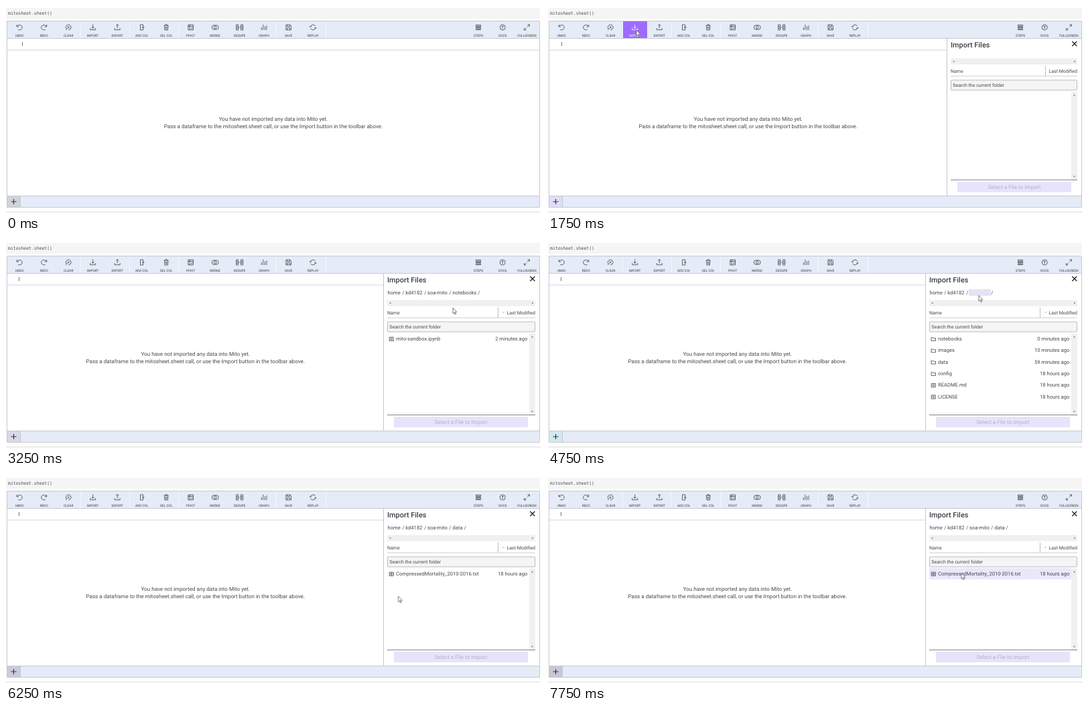
These frames come from a looping animation (800 px wide and 310 px high, 8 s). An HTML page:

```html
<!DOCTYPE html>
<html lang="en">
<head>
<meta charset="utf-8">
<title>Import files</title>
<style>
html, body { margin: 0; width: 100%; height: 100%; overflow: hidden; background: #fff; }
svg { display: block; width: 800px; height: 310px; font-family: Roboto, "Open Sans", sans-serif; text-rendering: geometricPrecision; }
text { fill: #444950; font-size: 7.6px; white-space: pre; }
.label { font-size: 4.75px; text-anchor: middle; fill: #333; }
.code { font: 6.45px "DejaVu Sans Mono", monospace; }
.msg { font-size: 8.1px; text-anchor: middle; }
.title { font-size: 10.9px; font-weight: 500; fill: #3a3f46; }
.small { font-size: 7px; }
.end { text-anchor: end; }
.btn { font-size: 8.15px; text-anchor: middle; fill: #b6adc8; }
.icon { fill: none; stroke: #3c4048; stroke-width: .8; }
.lit .icon { stroke: #fff; }
.lit text { fill: #fff; }
.hot { fill: #ebe7fb; }

.anim { animation: 8s step-end infinite; visibility: hidden; }
#idle { animation-name: idle; }
#empty { animation-name: empty; }
#notebooks { animation-name: notebooks; }
#project { animation-name: project; }
#data { animation-name: data; }
#hotImport { animation-name: hotImport; }
.hotCrumb { animation-name: hotCrumb; }
#project .hotRow0 { animation-name: hotFirst; }
#project .hotRow2 { animation-name: hotThird; }
#data .hotRow0 { animation-name: hotFile; }
#add { animation: add 8s step-end infinite; }
#pointer { animation: move 8s infinite; }

@keyframes idle { 0% { visibility: visible } 21.875%, 100% { visibility: hidden } }
@keyframes empty { 0% { visibility: hidden } 21.875% { visibility: visible } 25%, 100% { visibility: hidden } }
@keyframes notebooks { 0% { visibility: hidden } 25% { visibility: visible } 56.25%, 100% { visibility: hidden } }
@keyframes project { 0% { visibility: hidden } 56.25% { visibility: visible } 75%, 100% { visibility: hidden } }
@keyframes data { 0% { visibility: hidden } 75%, 100% { visibility: visible } }
@keyframes hotImport { 0% { visibility: hidden } 18.75% { visibility: visible } 28.125%, 100% { visibility: hidden } }
@keyframes hotCrumb { 0% { visibility: hidden } 50% { visibility: visible } 62.5%, 100% { visibility: hidden } }
@keyframes hotFirst { 0% { visibility: hidden } 65.625% { visibility: visible } 68.75%, 100% { visibility: hidden } }
@keyframes hotThird { 0% { visibility: hidden } 68.75% { visibility: visible } 75%, 100% { visibility: hidden } }
@keyframes hotFile { 0% { visibility: hidden } 93.75%, 100% { visibility: visible } }
@keyframes add {
  0% { fill: #d0d4d9 } 21.875% { fill: #e2dcf7 } 40.625% { fill: #d9d8e8 } 59.375% { fill: #d2e8f2 }
  68.75% { fill: #c9cbda } 81.25% { fill: #c6c1dc } 96.875%, 100% { fill: #c6c8d7 }
}
@keyframes move {
  0% { visibility: hidden; transform: translate(210px, 190px); animation-timing-function: step-end }
  6.25% { visibility: visible; transform: translate(210px, 190px); animation-timing-function: steps(4) }
  18.75% { transform: translate(132px, 36px) }
  25% { transform: translate(132px, 36px); animation-timing-function: steps(5) }
  40.625% { transform: translate(667px, 100px); animation-timing-function: steps(3) }
  50% { transform: translate(643px, 81.5px) }
  59.375% { transform: translate(643px, 81.5px); animation-timing-function: steps(3) }
  68.75% { transform: translate(586px, 176px) }
  75% { transform: translate(586px, 176px); animation-timing-function: steps(2) }
  81.25% { transform: translate(585px, 184px) }
  84.375% { transform: translate(585px, 184px); animation-timing-function: steps(4) }
  96.875%, 100% { visibility: visible; transform: translate(617px, 145.5px) }
}
</style>
</head>
<body>
<svg id="stage" viewBox="0 0 800 310"></svg>
<script>
const icons = {
  UNDO: 'M-4-4V-1H-1M-4-1.2C-2-4.6 4-4.2 4 0C4 3.6 0 4.4-2 3.4',
  REDO: 'M4-4V-1H1M4-1.2C2-4.6-4-4.2-4 0C-4 3.6 0 4.4 2 3.4',
  CLEAR: 'M-3.2 2.2A3.9 3.9 0 1 1 0 3.9M-1.6-1.6L1.6 1.6M1.6-1.6L-1.6 1.6M-4 4L-1.5 1.5',
  IMPORT: 'M0-4.5V1.5M-2-.5L0 1.5L2-.5M-4 1V3.7H4V1',
  EXPORT: 'M0 1.5V-4.5M-2-2.5L0-4.5L2-2.5M-4 1V3.7H4V1',
  'ADD COL': 'M2-4H-2.2V4H2V2M2-4V-2M0 0H4M2-2V2',
  'DEL COL': 'M-3.5-2.8H3.5M-1.2-2.8V-4.2H1.2V-2.8M-2.7-2.8L-2.3 4H2.3L2.7-2.8M-.8-1V2.5M.8-1V2.5',
  PIVOT: 'M-3.8-3.8H3.8V3.8H-3.8ZM-3.8-1.5H3.8M-1.5-3.8V3.8M.5 1.8H2.2V0',
  MERGE: 'M1.7 0A3.3 3.3 0 1 1-4.9 0A3.3 3.3 0 1 1 1.7 0M4.9 0A3.3 3.3 0 1 1-1.7 0A3.3 3.3 0 1 1 4.9 0',
  DEDUPE: 'M-5-4H-2V4H-5ZM2-4H5V4H2ZM-5-1.3H-2M-5 1.3H-2M2-1.3H5M2 1.3H5M-1 0H1',
  GRAPH: 'M-3.8 4V0M-1.3 4V-4.2M1.3 4V-1.5M3.8 4V-2.8',
  SAVE: 'M-3.8-3.8H2.5L3.8-2.5V3.8H-3.8ZM-2-3.8V-1.4H1.8V-3.8M-2 3.8V.8H2V3.8',
  REPLAY: 'M-3.8-.6A3.9 3.9 0 0 1 3.6-1.6M3.8.6A3.9 3.9 0 0 1-3.6 1.6M-5.4-1.6L-3.8 0L-2.2-1.6M5.4 1.6L3.8 0L2.2 1.6',
  STEPS: 'M-3.6-3.6H3.6V-1.8H-3.6ZM-3.6-.6H3.6V.8H-3.6ZM-3.6 2.2H3.6V3.6H-3.6Z',
  DOCS: 'M4 0A4 4 0 1 1-4 0A4 4 0 1 1 4 0M-1.5-1.6H1.5M0-1.6V2.2',
  FULLSCREEN: 'M.8-.8L4-4M1.2-4H4V-1.2M-.8.8L-4 4M-1.2 4H-4V1.2'
};
const fileIcons = {
  dir: 'M0-2.2H2.5L3.3-1.3H6.5V2.6H0Z',
  doc: 'M.2-2.7H6.3V2.7H.2ZM1.5-.9H5M1.5.8H5',
  grid: 'M.2-2.7H6.3V2.7H.2ZM.2 0H6.3M3.2-2.7V2.7'
};

const rect = (x, y, w, h, fill, extra = '') => `<rect x="${x}" y="${y}" width="${w}" height="${h}" fill="${fill}" ${extra}/>`;
const path = (d, stroke, width = 1) => `<path d="${d}" fill="none" stroke="${stroke}" stroke-width="${width}"/>`;
const text = (x, y, s, cls = '') => `<text x="${x}" y="${y}" class="${cls}">${s}</text>`;
const group = (id, body) => `<g id="${id}" class="anim">${body}</g>`;
const icon = (x, y, d) => `<path class="icon" transform="translate(${x} ${y})" d="${d}"/>`;
const tri = (x, y, dx, dy) =>
  `<path fill="#8a8a8a" d="M${x + dx * 1.5} ${y + dy * 1.5}L${x - dx + dy * 1.6} ${y - dy + dx * 1.6}L${x - dx - dy * 1.6} ${y - dy - dx * 1.6}Z"/>`;
const tool = (name, x) => icon(x, 32, icons[name]) + text(x, 46, name, 'label');

function toolbar() {
  return Object.keys(icons).map((name, i) => tool(name, i < 13 ? 20.2 + i * 36.5 : 705 + (i - 13) * 36.2)).join('') +
    [111.5, 184.5, 257.5, 403.5, 477.5].map(x => path(`M${x} 24V48`, '#f4f7fd')).join('');
}

function sheet(right, caret) {
  const mid = (right + 2) / 2;
  return path(`M2 66H${right}`, '#d3d5d9') + path(`M${caret} 54V60`, '#555', .8) +
    text(mid, 172.4, 'You have not imported any data into Mito yet.', 'msg') +
    text(mid, 182.9, 'Pass a dataframe to the mitosheet.sheet call, or use the Import button in the toolbar above.', 'msg');
}

function crumbs(names) {
  const starts = [569.5, 596.3, 629, 666.5], ends = [591.2, 624.2, 661.2];
  return names.map((name, i) => {
    const slash = i < 3 ? ends[i] : name === 'data' ? 683.5 : 704.2;
    return text(starts[i], 80, name) + text(slash, 80, '/');
  }).join('');
}

function panel(left, names, rows) {
  const x = left + 5.5, dy = names.length ? 0 : -10, split = dy ? 742.5 : 734.5;
  const width = 790 - x, bx = left + 15.5, bw = (dy ? 781 : 779) - bx;
  let out = sheet(left, dy ? 20.5 : 19.5) + path(`M${left} 49V284`, '#c3c6cc') +
    text(x, 61.8, 'Import Files', 'title') +
    path('M782.3 53L789.3 60M789.3 53L782.3 60', '#222', 1.3);
  if (names[2]) out += rect(628, 72.5, 32.5, 9.5, '#e3e4f3', 'class="anim hotCrumb"');
  out += crumbs(names) +
    rect(x, 88.5 + dy, width, 9, '#f0f0f0') + tri(x + 4.5, 93 + dy, -1, 0) + tri(786, 93 + dy, 1, 0) +
    text(x, 109.5 + dy, 'Name', 'small') + text(790, 109.5 + dy, 'Last Modified', 'small end') +
    path(`M${split} 99.5V${115}`.replace('99.5', 99.5 + dy).replace(/115$/, 115 + dy), '#b5b7bb', .9) +
    path(`M${x} ${115 + dy}H790`, '#c6c8cc', .9) +
    (dy ? '' : path('M741 107H744', '#999', .7)) +
    rect(x + .5, 121 + dy, width - 1, 15, '#f5f5f5', 'stroke="#b9bbbf" rx="1"') +
    text(x + 3.3, 131 + dy, 'Search the current folder', 'small') +
    rect(781, 138.5 + dy, 9, 122 - dy, '#f0f0f0') + tri(785.5, 143.5 + dy, 0, -1) + tri(785.5, 255.5, 0, 1);
  rows.forEach(([kind, name, age], i) => {
    const y = 146.3 + i * 17.35;
    out += `<rect x="${x}" y="${y - 8.5}" width="${781 - x}" height="17" class="hot anim hotRow${i}"/>` +
      icon(x + 3, y + .5, fileIcons[kind]) + text(x + 13, y + 2.6, name) + text(778.3, y + 2.6, age, 'end');
  });
  return out + path(`M${x} 260.5H790`, '#777', .9) + rect(bx, 263, bw, 16, '#e8e3fb') +
    text(bx + bw / 2, 273.9, 'Select a File to Import', 'btn');
}

const root = ['home', 'kd4182', 'soa-mito'];
const projectRows = [
  ['dir', 'notebooks', '0 minutes ago'], ['dir', 'images', '10 minutes ago'],
  ['dir', 'data', '59 minutes ago'], ['dir', 'config', '18 hours ago'],
  ['doc', 'README.md', '18 hours ago'], ['doc', 'LICENSE', '18 hours ago']
];

document.getElementById('stage').innerHTML =
  rect(0, 3, 797, 16, '#f5f5f5') +
  text(3, 13, 'mitosheet<tspan fill="#7a58b0">.</tspan>sheet()', 'code') +
  rect(2, 23, 794, 25.5, '#e5ebf7') + toolbar() +
  group('hotImport', `<g class="lit">${rect(112, 23, 36, 25, '#9d6cff')}${tool('IMPORT', 129.7)}</g>`) +
  group('idle', sheet(796, 24.5)) +
  group('empty', panel(595.5, [], [])) +
  group('notebooks', panel(563.5, [...root, 'notebooks'], [['doc', 'mito-sandbox.ipynb', '2 minutes ago']])) +
  group('project', panel(563.5, root, projectRows)) +
  group('data', panel(563.5, [...root, 'data'], [['grid', 'CompressedMortality_2010-2016.txt', '18 hours ago']])) +
  rect(2, 285, 794, 16, '#e5ebf7') + rect(2, 285, 19.5, 16, '#d0d4d9', 'id="add"') +
  path('M21.5 285V301', '#c3c8d2') + path('M7.5 293H15.5M11.5 289V297', '#333', 1.1) +
  path('M1.5 22.5H796.5V301.5H1.5ZM1.5 48.5H796.5M1.5 284.5H796.5', '#c5c9d0') +
  path('M0 308.5H798', '#dddddd') +
  '<g id="pointer"><path d="M0 0V8.6L1.9 6.9L3.3 10L4.6 9.4L3.2 6.4H5.8Z" fill="#fff" stroke="#444" stroke-width=".7"/></g>';
</script>
</body>
</html>
```
